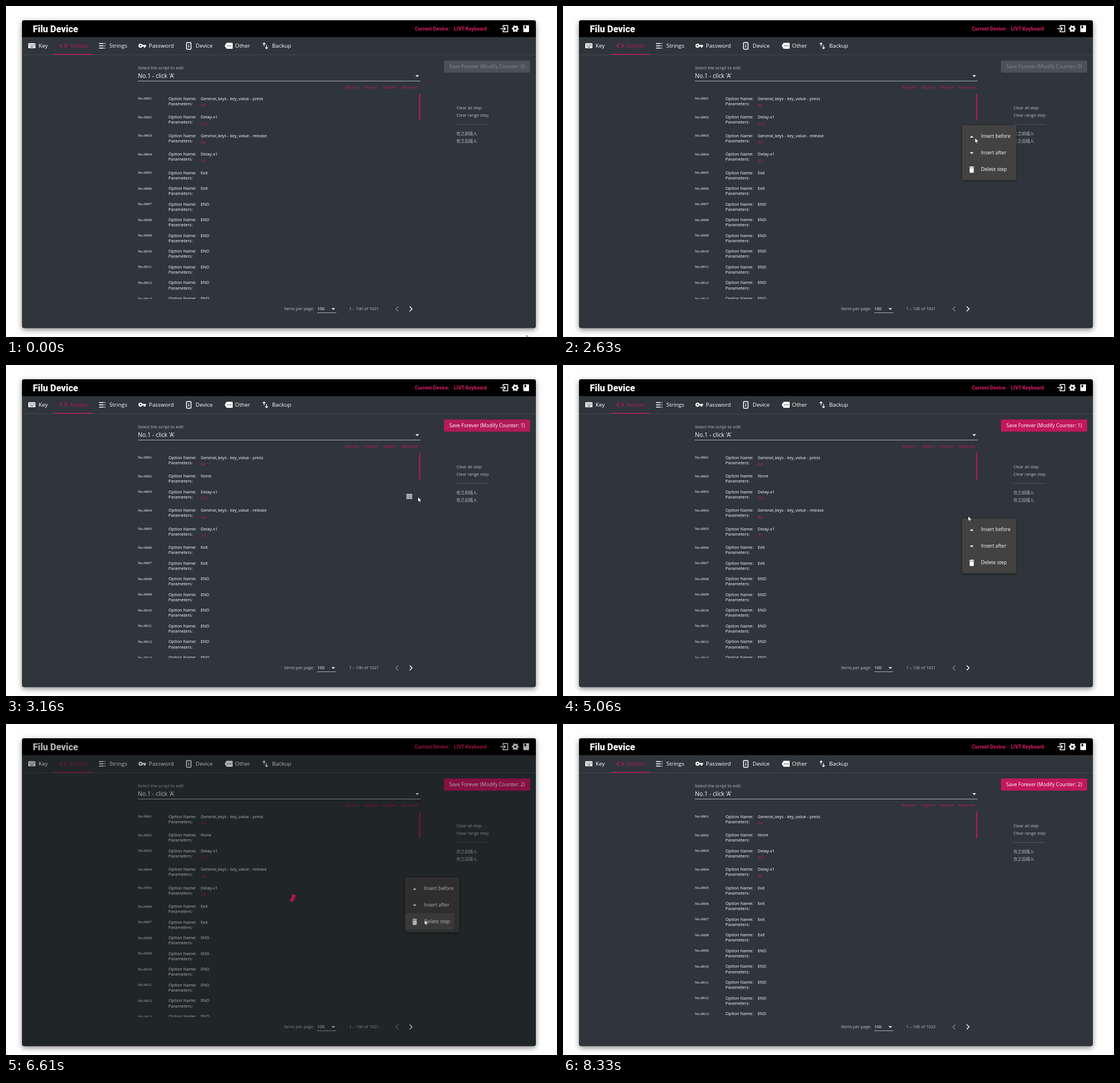
Write an HTML page that moves like this. It is 965 px wide and 580 px high and loops after 8.83 s.

```html
<!DOCTYPE html>
<html lang="en">
<head>
<meta charset="utf-8">
<title>Script editor</title>
<style>
  html, body { margin: 0; width: 100%; height: 100%; overflow: hidden; background: #fefefe; }
  svg { display: block; font-family: "Open Sans", "Noto Sans", sans-serif; }
  .heavy { font-family: Roboto, sans-serif; font-weight: 900; }
  .serif { font-family: "Liberation Serif", serif; }
  .cjk { font-family: "Noto Sans CJK SC", "Noto Sans CJK", sans-serif; }
  .card { filter: drop-shadow(0 3px 5px rgba(0, 0, 0, .45)); }
  .menu { filter: drop-shadow(0 1px 2px rgba(0, 0, 0, .5)); }
</style>
</head>
<body>
<svg id="stage" width="965" height="580" viewBox="0 0 965 580">
  <defs>
    <clipPath id="listClip"><rect x="228" y="153" width="500" height="360.6"/></clipPath>
    <clipPath id="cardClip"><rect x="28" y="25" width="900" height="539.5" rx="4"/></clipPath>
  </defs>
  <g id="base"></g>
  <g id="live"></g>
</svg>
<script>
const LOOP = 8830;
const PINK = '#c2185b', PANEL = '#2f353a', SOFT = '#bdc0c3';

const text = (x, y, size, s, fill = '#fff', attrs = '') =>
  `<text x="${x}" y="${y}" font-size="${size}" fill="${fill}" ${attrs}>${s}</text>`;
const rect = (x, y, w, h, fill, attrs = '') =>
  `<rect x="${x}" y="${y}" width="${w}" height="${h}" fill="${fill}" ${attrs}/>`;
const line = (d, color = '#fff', width = 1.4) =>
  `<path d="${d}" fill="none" stroke="${color}" stroke-width="${width}"/>`;
const shape = (d, fill = '#fff', attrs = '') => `<path d="${d}" fill="${fill}" ${attrs}/>`;
const dots = (xs, y, size, fill) => xs.map(x => rect(x, y, size, size, fill)).join('');

function headerIcons() {
  return line('M870.5 37.5V34.3H878.7V45.2H870.5V42M866 39.8H874.5M871.7 36.8L874.7 39.8L871.7 42.8') +
    '<circle cx="892" cy="39.8" r="3.4" fill="none" stroke="#fff" stroke-width="2.7"/>' +
    '<circle cx="892" cy="39.8" r="5.2" fill="none" stroke="#fff" stroke-width="1.8" ' +
    'stroke-dasharray="2.9 2.545" stroke-dashoffset="1.45"/>' +
    rect(906, 33.8, 10, 12, '#fff', 'rx="1.2"') + shape('M908 34.8H911V39.6L909.5 38.6L908 39.6Z', '#000');
}

function navIcons() {
  return rect(39, 65.3, 12.5, 8.8, '#fff', 'rx="1.2"') +
    dots([41, 43.1, 45.2, 47.3, 49.2], 67, 1.1, PANEL) +
    dots([41, 43.1, 45.2, 47.3, 49.2], 69, 1.1, PANEL) + rect(42.8, 71.3, 5, 1.2, PANEL) +
    line('M98 66L94.5 69.5L98 73M102.5 66L106 69.5L102.5 73', PINK) +
    line('M163 65.7H171M163 69.7H171M163 73.7H171') + [65, 69, 73].map(y => dots([172.5], y, 1.5, '#fff')).join('') +
    '<circle cx="235.6" cy="69.6" r="2.5" fill="none" stroke="#fff" stroke-width="2.1"/>' +
    shape('M238 68.3H245.2V70.9H244V73H241.5V70.9H238Z') +
    rect(316.2, 63.9, 7.8, 11.8, 'none', 'rx="1" stroke="#fff" stroke-width="1.5"') +
    rect(319.4, 66.6, 1.4, 1.4, '#fff') + rect(319.4, 69, 1.4, 3.8, '#fff') +
    shape('M383 69.7L386 64.8Q386.4 64.4 387 64.4H396Q397 64.4 397 65.4V74Q397 75 396 75H387Q386.4 75 386 74.6Z') +
    dots([387, 390, 393], 69, 1.5, PANEL) +
    line('M452 70.5V65M449.7 67L452 64.7L454.3 67M456.3 68.5V74.5M454 72.5L456.3 74.8L458.6 72.5', '#fff', 1.2);
}

function base() {
  const tabs = [[57, 'Key'], [112, 'Scripts'], [181, 'Strings'], [250, 'Password'],
                [332, 'Device'], [401, 'Other'], [466, 'Backup']];
  const links = [[594, 'Record'], [628, 'Import'], [661, 'Export'], [693, 'Rename']];
  return rect(28, 25, 900, 539.5, PANEL, 'rx="4" class="card"') +
    rect(28, 25, 900, 29.5, '#000', 'clip-path="url(#cardClip)"') +
    text(47, 46, 16, 'Filu Device', '#fff', 'class="heavy"') +
    text(716, 43, 8.7, 'Current Device:', PINK, 'class="heavy"') +
    text(842, 43, 8.7, 'LIVT Keyboard', PINK, 'class="heavy" text-anchor="end"') +
    headerIcons() + navIcons() +
    tabs.map(([x, s]) => text(x, 73.2, 9.8, s, s === 'Scripts' ? PINK : '#fff')).join('') +
    rect(28, 85, 900, 1, '#42484d') + rect(83, 84, 69, 1.3, PINK) +
    text(231, 111.2, 7.5, 'Select the script to edit', SOFT) +
    text(231, 126, 10.3, "No.1 - click 'A'") +
    rect(231, 131, 495, 1, '#a9adb0') + shape('M717 121.2H723.4L720.2 124.4Z') +
    links.map(([x, s]) => text(x, 145.2, 7.3, s, PINK)).join('') +
    rect(723.6, 153.5, 2, 47, PINK) +
    text(789, 181, 7.4, 'Clear all step', SOFT) + text(789, 194, 7.4, 'Clear range step', SOFT) +
    rect(789, 207, 56, 1, '#50565b') +
    text(789, 226.3, 7.2, '在之前插入', SOFT, 'class="cjk"') +
    text(789, 239.3, 7.2, '在之后插入', SOFT, 'class="cjk"') +
    text(487, 533.3, 7.3, 'Items per page:', SOFT) + text(545, 533.3, 7.5, '100') +
    rect(545, 537, 33.5, 1, '#a9adb0') + shape('M570 529.4H576.4L573.2 532.6Z') +
    line('M687 526.6L682.8 530.8L687 535', '#8b8f92', 1.2) + line('M707 526.6L711.2 530.8L707 535');
}

// Script steps: [option name, parameter]
const press = ['General_keys - key_value - press', 'Aa'];
const release = ['General_keys - key_value - release', 'Aa'];
const longDelay = ['Delay-x1', '222'], shortDelay = ['Delay-x1', '35'];
const none = ['None'], exit = ['Exit'], end = ['END'];

function layout(steps) {
  let y = 162;
  return Array.from({ length: 13 }, (_, i) => {
    const [name, value] = steps[i] || end;
    const row = { name, value, y, height: value ? 32.45 : 27.55 };
    y += row.height;
    return row;
  });
}
const initialRows = layout([press, longDelay, release, shortDelay, exit, exit]);
const insertedRows = layout([press, none, longDelay, release, shortDelay, exit, exit]);
const deletedRows = layout([press, none, longDelay, shortDelay, exit, exit, exit, exit]);

// The pointer holds each place until the next time: [ms, x, y]
const pointerPath = [
  [0, 912, 577], [170, 862, 470], [350, 790, 330], [520, 720, 222], [700, 668, 178],
  [870, 690, 182], [1080, 706, 194], [1250, 710, 198], [1420, 709, 200], [1600, 709, 201.5],
  [2120, 712, 208], [2300, 717, 219], [2470, 721, 228], [2630, 721.5, 231],
  [3850, 721, 236], [4020, 720, 246], [4200, 718, 262], [4370, 717, 270], [4540, 713, 268],
  [4710, 710, 266], [4880, 709.5, 264.5], [5390, 735, 282], [5560, 771, 318], [5730, 752, 338],
  [5910, 733, 343], [7630, 765, 380], [7800, 830, 450], [7980, 890, 520], [8150, 927, 554],
  [8330, 980, 600]
];

const drawRow = ({ name, value, y }, i) =>
  text(231, y + 2.3, 7, 'No.' + String(i + 1).padStart(4, '0'), '#fff', 'class="serif"') +
  text(284.5, y + 2.8, 7.5, 'Option Name:') + text(284.5, y + 11.9, 7.5, 'Parameters:') +
  text(341, y + 2.8, 7.4, name) + (value ? text(341, y + 14.3, 7.2, value, PINK) : '');

function drawMenu(y, hoverRow, hoverWidth) {
  const label = (i, s) => text(732, y + 22.3 + i * 28.8, 8.6, s);
  return rect(699, y, 95, 96, '#424242', 'rx="2" class="menu"') +
    (hoverWidth ? rect(699, y + 5 + hoverRow * 28.8, hoverWidth, 28.6, 'rgba(255,255,255,.09)') : '') +
    label(0, 'Insert before') + label(1, 'Insert after') + label(2, 'Delete step') +
    shape(`M712.6 ${y + 21.4}h6.4l-3.2 -3.2z`) + shape(`M712.6 ${y + 47.2}h6.4l-3.2 3.2z`) +
    rect(711.6, y + 72.8, 8.4, 1.3, '#fff') + rect(714, y + 72, 3.6, 1.2, '#fff') +
    rect(712.2, y + 74.8, 7.2, 8.4, '#fff', 'rx="1"');
}

function drawSpinner(from, to) {
  const point = deg => {
    const a = deg * Math.PI / 180;
    return `${478 + 26.8 * Math.cos(a)} ${294.5 + 26.8 * Math.sin(a)}`;
  };
  return line(`M${point(from)}A26.8 26.8 0 0 1 ${point(to)}`, '#b8144f', 5.6);
}

function drawScene(t) {
  const during = (from, to) => t >= from && t < to;
  const rows = t < 3160 ? initialRows : t < 6780 ? insertedRows : deletedRows;
  const counter = t < 2980 ? 0 : t < 6430 ? 1 : 2;
  const inserting = during(2980, 3160), deleting = during(6430, 6780);
  const firstMenu = during(1770, 3160), secondMenu = during(5060, 6780);
  const [, px, py] = pointerPath.findLast(([start]) => start <= t);

  const buttonFill = t < 2980 ? '#4b5155' : inserting ? '#5a4651' : t < 3330 ? '#b41b58' : PINK;
  let out = `<g clip-path="url(#listClip)">${rows.map(drawRow).join('')}</g>` +
    rect(767, 95.5, 151, 21.3, buttonFill, 'rx="2"') +
    text(842.5, 109.2, 8.75, `Save Forever (Modify Counter: ${counter})`,
      counter ? '#fff' : '#858a8d', 'text-anchor="middle"') +
    text(601, 533.3, 7.35, `1 – 100 of ${t < 6780 ? 1021 : 1022}`, SOFT);

  const hovered = px < 726 && !firstMenu && !secondMenu &&
    rows.find(r => py >= r.y - 8 && py < r.y - 8 + r.height);
  if (hovered) {
    for (let i = 0; i < 4; i++) out += rect(701, hovered.y + 4 + i * 2.4, 10.5, 1.3, '#fff');
  }
  if (during(1770, 2120)) out += '<circle cx="712.5" cy="200" r="6" fill="#263035"/>';
  if (firstMenu) out += drawMenu(209, 0, inserting && 72);
  if (secondMenu) out += drawMenu(269, 2, deleting && 86);
  if (inserting || deleting) {
    out += rect(28, 25, 900, 539.5, 'rgba(0,0,0,.31)', 'rx="4"');
    out += inserting || t < 6610 ? drawSpinner(2, 20) : drawSpinner(9, 37);
  }
  return out + shape('M0 0V9.2L2.2 7.3L3.6 10.5L5 9.9L3.7 6.8H6.5Z', '#fff',
    `transform="translate(${px} ${py})" stroke="#000" stroke-width=".6"`);
}

const live = document.getElementById('live');
document.getElementById('base').innerHTML = base();

let shown = '';
const startTime = performance.now();
function tick() {
  const scene = drawScene((performance.now() - startTime) % LOOP);
  if (scene !== shown) live.innerHTML = shown = scene;
  requestAnimationFrame(tick);
}
tick();
</script>
</body>
</html>
```
